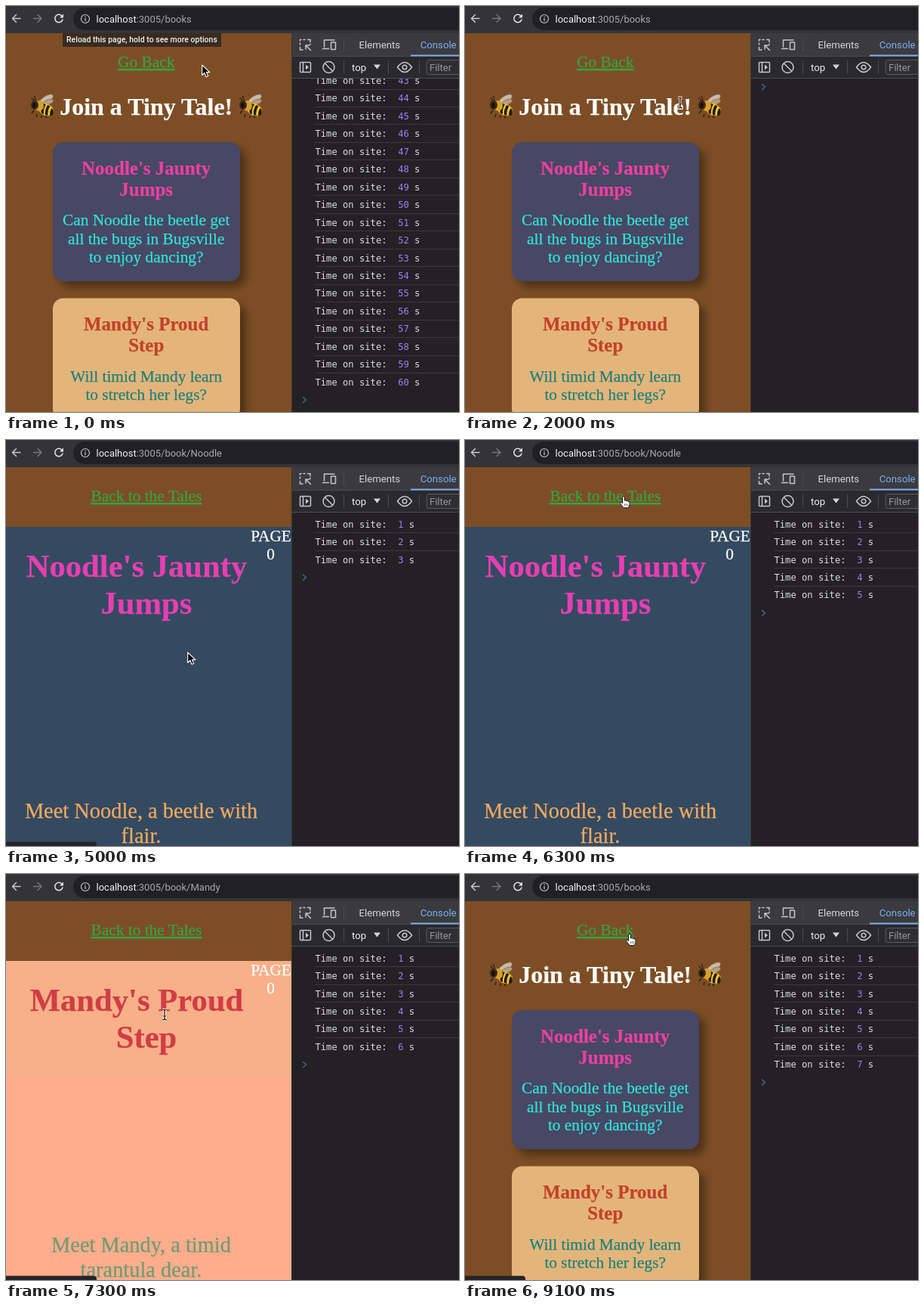
Recreate the animation shown at these times as an HTML page. Size 600 px wide and 537 px high, loop 9.2 s.

```html
<!DOCTYPE html>
<html lang="en">
<head>
<meta charset="utf-8">
<title>Time on site</title>
<style>
  html, body { margin: 0; width: 100%; height: 100%; overflow: hidden; background: #232124; }
  svg { display: block; width: 600px; height: 537px; }
  text { white-space: pre; }
  .ui { font-family: Roboto, Inter, sans-serif; font-size: 13px; }
  .serif { font-family: "Liberation Serif", "Times New Roman", serif; font-size: 21.33px; text-anchor: middle; stroke-width: .25; }
  .h3 { font-size: 24.96px; font-weight: bold; }
  .h2 { font-size: 32px; font-weight: bold; }
  .h1 { font-size: 42.67px; font-weight: bold; }
  .big { font-size: 28.4px; }
  .link { text-decoration: underline; }
  .mono { font-family: "DejaVu Sans Mono", "Liberation Mono", monospace; font-size: 12.15px; fill: #dedde1; }
  .line { fill: none; stroke: #c7c7c9; stroke-width: 1.5; stroke-linecap: round; stroke-linejoin: round; }
</style>
</head>
<body>
<svg viewBox="0 0 600 537" xmlns="http://www.w3.org/2000/svg">
  <defs>
    <filter id="shade" x="-20%" y="-20%" width="150%" height="150%">
      <feDropShadow dx="8" dy="8" stdDeviation="6" flood-color="#000" flood-opacity=".38"/>
    </filter>
    <clipPath id="pageClip"><rect y="36" width="378" height="501"/></clipPath>
    <clipPath id="logClip"><rect x="379" y="96" width="221" height="441"/></clipPath>
    <g id="bee">
      <path d="M9 27l-1 4M15 29l0 3M20 29l2 3M5 22l-3 4" stroke="#2b1c12" stroke-width="1.4" fill="none"/>
      <ellipse cx="21" cy="8" rx="11" ry="4.6" transform="rotate(-34 21 8)" fill="#cbb9a4" stroke="#7d6650" stroke-width=".7"/>
      <ellipse cx="24" cy="11" rx="7" ry="3.2" transform="rotate(-20 24 11)" fill="#b39d86" stroke="#7d6650" stroke-width=".7"/>
      <ellipse cx="21" cy="21" rx="10.5" ry="7.6" transform="rotate(24 21 21)" fill="#f3c52c"/>
      <path d="M17 13q-4 7-2 13l3 1q-1-7 3-13zM23 15q-4 7-3 13l3.500 1q-1-7 3-12.500zM28.500 19q-3 5-2.500 10l3.500-.5q2-3 1-7z" fill="#211a16"/>
      <ellipse cx="12" cy="16" rx="6" ry="7" fill="#d89f2b"/>
      <ellipse cx="6" cy="15" rx="5" ry="6" fill="#3b2919"/>
      <ellipse cx="5.500" cy="15.500" rx="2.200" ry="3.400" fill="#17100c"/>
      <path d="M5 10q-1-4-4-4M7 9q0-4-2-6" stroke="#2b1c12" stroke-width="1.200" fill="none"/>
    </g>
  </defs>

  <g clip-path="url(#pageClip)">
    <rect y="36" width="378" height="501" fill="#7d4e25"/>
    <g id="books"></g>
    <g id="noodle"></g>
    <g id="mandy"></g>
    <path id="status" fill="#252427"/>
  </g>

  <!-- browser bar -->
  <rect width="600" height="36" fill="#343437"/>
  <rect x="89" y="2" width="530" height="30" rx="15" fill="#212124"/>
  <circle id="hover" cx="70" cy="17" r="12.5" fill="#525255"/>
  <path class="line" d="M19 16.500H9M13.500 11.500l-5 5 5 5" stroke="#e4e4e6"/>
  <path class="line" d="M36.500 16.500h10M42 11.500l5 5-5 5" style="stroke:#77777a"/>
  <path class="line" d="M74.300 13.500a5.200 5.200 0 1 0 .7 4.500" style="stroke:#e4e4e6"/>
  <path d="M76 10.500v5h-5z" fill="#e4e4e6"/>
  <circle cx="105" cy="17" r="5.500" class="line" style="stroke-width:1.200"/>
  <path d="M105 16.500v3M105 14v.3" class="line" style="stroke-width:1.300"/>
  <text class="ui" x="119.500" y="21.600" fill="#f1f1f2">localhost<tspan id="path" fill="#a9a9ad"></tspan></text>
  <g id="tip">
    <rect x="75" y="36" width="210" height="18" fill="#392b20"/>
    <text class="ui" x="80" y="48" fill="#f3f1ee" style="font-size:10.500px;font-weight:500">Reload this page, hold to see more options</text>
  </g>

  <!-- developer tools -->
  <rect x="378" y="36" width="222" height="501" fill="#232124"/>
  <rect x="378" y="36" width="222" height="30" fill="#3b3b3d"/>
  <rect x="378" y="66" width="222" height="30" fill="#2a292c"/>
  <path d="M378.500 36v501" stroke="#363538"/>
  <path d="M378 66.500h222M378 95.500h222M447.500 42v18M447.500 72v18M506.500 72v18M547.500 72v18" stroke="#4b4a4e" fill="none"/>
  <rect x="536" y="64.500" width="64" height="2" fill="#7cacf8"/>
  <path class="line" d="M393 58h-3.500v-3.500M389.500 51v-2M389.500 46v-1.500h1.500M394 44.500h2M399.500 44.500h3.500v3M403 50v1M403.500 58.500l-6-6M397 57v-5h5"/>
  <path class="line" d="M421.500 54v-9h13.500M419.500 56.500h8"/>
  <rect class="line" x="430.500" y="48" width="6" height="9.500" rx=".5"/>
  <g class="ui" fill="#d5d5d8" style="font-size:13.200px">
    <text x="467.500" y="55.700">Elements</text>
    <text x="548.700" y="55.700" fill="#7cacf8">Console</text>
    <text x="458" y="85.500" fill="#eeeef0">top</text>
    <path d="M487 77.500h9l-4.500 6z"/>
  </g>
  <rect class="line" x="389.500" y="74.500" width="14" height="13" rx="1"/>
  <path class="line" d="M393.500 75v12"/>
  <path d="M397 77.500l4 3.500-4 3.500z" fill="#c7c7c9"/>
  <circle class="line" cx="427.500" cy="81" r="7.500"/>
  <path class="line" d="M422.500 76l10 10"/>
  <path class="line" d="M518.500 81q9.500-13 19 0q-9.500 13-19 0z"/>
  <circle class="line" cx="528" cy="81" r="2.800"/>
  <rect x="557" y="71.500" width="60" height="19" rx="3" fill="#2f2e31" stroke="#5a595d"/>
  <text class="ui" x="561" y="85.500" fill="#98979c">Filter</text>
  <g id="log" clip-path="url(#logClip)"></g>

  <!-- pointers -->
  <g id="arrow"><path d="M.7 0v13.500l3.200-3 2.200 5.200 2.600-1.100-2.200-5h4.400z" fill="#0b0b0b" stroke="#fff" stroke-width="1.100" stroke-linejoin="round"/></g>
  <g id="hand"><path d="M-1.500 0q1.500-1.500 3 0v5q1.300-1 2.400.3q1.300-.6 2.200.6q1.700-.4 1.900 1.500v3l-1.500 4h-6.500l-4.500-6q0-2 1.800-1.200l1.200 1.300z" fill="#fff" stroke="#111" stroke-width="1" stroke-linejoin="round"/><path d="M1.500 9v3M3.500 9v3M5.500 9v3" stroke="#333" stroke-width=".7"/></g>
  <g id="beam"><path d="M-3-7q3 0 3 2q0-2 3-2M0-5V5M-3 7q3 0 3-2q0 2 3 2M-1.500 2h3" fill="none" stroke="#fff" stroke-width="3"/><path d="M-3-7q3 0 3 2q0-2 3-2M0-5V5M-3 7q3 0 3-2q0 2 3 2M-1.500 2h3" fill="none" stroke="#111" stroke-width="1.200"/></g>
</svg>
<script>
const LOOP = 9200, STEP = 100, ROW = 23.47, LINK = '#32a642';
const $ = id => document.getElementById(id);
const show = (id, on) => { $(id).style.display = on ? '' : 'none'; };
const label = (x, y, s, fill, cls = '') =>
  `<text class="serif ${cls}" x="${x}" y="${y}" fill="${fill}" stroke="${fill}">${s}</text>`;
const lines = (x, y, gap, list, fill, cls) =>
  list.map((s, i) => label(x, y + i * gap, s, fill, cls)).join('');

const card = (y, h, bg, title, titleFill, body, bodyFill) =>
  `<rect x="62" y="${y}" width="248" height="${h}" rx="14" fill="${bg}" filter="url(#shade)"/>` +
  lines(185.7, y + 42.5, 28.3, title, titleFill, 'h3') +
  lines(185.7, y + 110.4, 24.4, body, bodyFill);

const book = (bg, title, titleFill, body, bodyFill, extra = '') =>
  `<rect y="115" width="378" height="422" fill="${bg}"/>` + extra +
  label(186, 81, 'Back to the Tales', LINK, 'link') +
  label(351, 133.5, 'PAGE', '#fff') + label(350.5, 158, '0', '#fff') +
  label(173, 180.5, title[0], titleFill, 'h1') + label(186, 229.5, title[1], titleFill, 'h1') +
  lines(179, 500, 32.6, body, bodyFill, 'big');

const first = ["Noodle's Jaunty", 'Jumps'], second = ["Mandy's Proud", 'Step'];

$('books').innerHTML =
  label(185.7, 81, 'Go Back', LINK, 'link') +
  label(185.7, 144, 'Join a Tiny Tale!', '#fff', 'h2') +
  '<use href="#bee" x="32" y="116"/><use href="#bee" x="308" y="116"/>' +
  card(180, 184, '#464766', first, '#ee419c',
    ['Can Noodle the beetle get', 'all the bugs in Bugsville', 'to enjoy dancing?'], '#30e6d3') +
  card(386.5, 160, '#e3b57a', second, '#c3412a',
    ['Will timid Mandy learn', 'to stretch her legs?'], '#1d807b');
$('noodle').innerHTML = book('#344a60', first, '#e63fb2',
  ['Meet Noodle, a beetle with', 'flair.'], '#f3a95f');
$('mandy').innerHTML = book('#ffad8c', second, '#d13d45',
  ['Meet Mandy, a timid', 'tarantula dear.'], '#6f9b74',
  '<rect y="115" width="378" height="153" fill="#f7b089"/>');

// time, x, y, pointer from that time on
const moves = [
  [0, 259, 78, 'arrow'], [200, 240, 68, 'arrow'], [800, 71, 18, 'arrow'],
  [1400, 71, 18, 'arrow'], [1900, 280, 122, 'beam'], [2000, 285, 128, 'beam'],
  [2600, 285, 128, 'beam'], [2900, 262, 102, 'arrow'], [3300, 216, 79, 'hand'], [4000, 218, 80, 'hand'],
  [4200, 222, 108, 'arrow'], [4400, 236, 240, 'hand'], [4600, 240, 281, 'hand'],
  [4800, 240, 281, 'arrow'], [5600, 240, 281, 'arrow'], [6100, 210, 76, 'hand'],
  [6400, 210, 75, 'hand'], [6500, 209, 180, 'hand'], [6700, 206, 430, 'hand'],
  [6900, 206, 430, 'arrow'], [7000, 206, 425, 'arrow'], [7300, 210, 186, 'beam'],
  [7500, 212, 120, 'arrow'], [7800, 217, 80, 'hand'], [9100, 218, 80, 'hand']
];
// time, page, address
const pages = [
  [0, 'books', 'books'], [4800, 'noodle', 'book/Noodle'], [6400, 'books', 'books'],
  [6900, 'mandy', 'book/Mandy'], [8500, 'books', 'books']
];
// time, width of the link bubble
const bubbles = [[0, 0], [3500, 80], [4400, 120], [5200, 0], [6600, 120], [7500, 0], [8000, 120], [8500, 80]];
const at = (table, t) => table.filter(r => r[0] <= t).pop();

function pointer(t) {
  const a = at(moves, t), b = moves[moves.indexOf(a) + 1] || a;
  const p = b === a ? 0 : (t - a[0]) / (b[0] - a[0]);
  const k = p * p * (3 - 2 * p);
  const x = a[1] + (b[1] - a[1]) * k, y = a[2] + (b[2] - a[2]) * k;
  for (const id of ['arrow', 'hand', 'beam']) show(id, id === a[3]);
  $(a[3]).setAttribute('transform', `translate(${x.toFixed(1)} ${y.toFixed(1)})`);
  show('hover', Math.hypot(x - 70, y - 17) < 14);
}

function log(t) {
  const old = t < 1200;
  const last = old ? (t < 500 ? 60 : 61) : Math.max(0, Math.floor((t - 1300) / 1000));
  const from = old ? last - 17 : 1;
  let y = old ? 98.5 : 111.3, out = '';
  for (let n = from; n <= last; n++, y += ROW) {
    out += `<text class="mono" x="409.500" y="${y + 4.3}">Time on site:  <tspan fill="#9a80f8">${n}</tspan> s</text>`;
    if (n < last) out += `<path d="M409 ${Math.round(y + 11) + .5}h191" stroke="#3b393d"/>`;
  }
  if (!old && !last) y = 107;
  $('log').innerHTML = out + `<path class="line" d="M393.500 ${y - 3.5}l4 3.500-4 3.500" style="stroke:#53699f;stroke-width:1.300"/>`;
}

function draw(t) {
  const [, page, path] = at(pages, t);
  for (const id of ['books', 'noodle', 'mandy']) show(id, id === page);
  $('path').textContent = ':3005/' + path;
  const w = at(bubbles, t)[1];
  show('status', w);
  $('status').setAttribute('d', `M0 531.500H${w - 4}q4 0 4 4V537H0z`);
  show('tip', t < 300);
  log(t);
  pointer(t);
}

const start = performance.now();
let shown = -1;
function tick() {
  const t = Math.floor(((performance.now() - start) % LOOP) / STEP) * STEP;
  if (t !== shown) draw(shown = t);
  requestAnimationFrame(tick);
}
tick();
</script>
</body>
</html>
```
